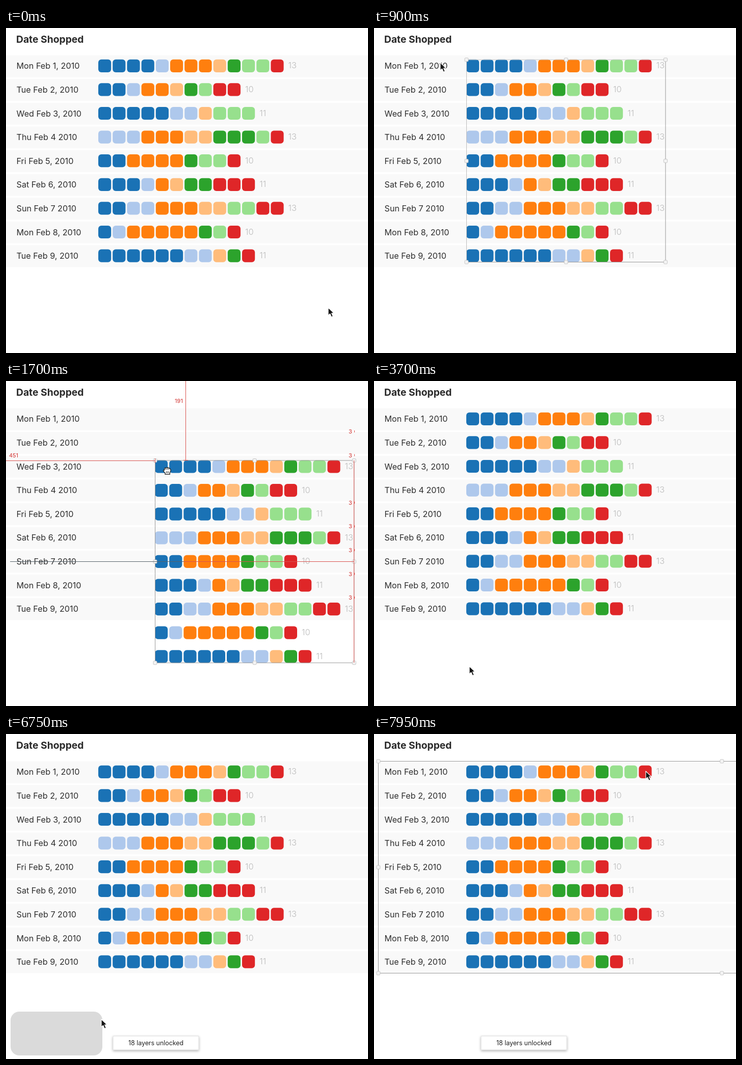
An HTML page that plays this animation: 710x638 px, repeating every 8000 ms.

```html
<!DOCTYPE html>
<html lang="en">
<head>
<meta charset="utf-8">
<title>Date Shopped</title>
<style>
  html, body { margin: 0; width: 100%; height: 100%; overflow: hidden; background: #fff; }
  svg { display: block; width: 710px; height: 638px; font-family: Inter, sans-serif; }
  .title { font-size: 19.3px; font-weight: 700; fill: #2a2a2a; }
  .date { font-size: 16.2px; fill: #2e2e2e; }
  .count { font-size: 16.5px; font-weight: 300; fill: #bcbcbc; }
  .note { font-size: 12.4px; fill: #222; text-anchor: middle; }
  .guide text { font-size: 11px; fill: #d0312f; text-anchor: middle; }
  .red { stroke: #d9534f; }
  .dark { stroke: #56626a; }
  .navy { stroke: #4c5878; }
</style>
</head>
<body>
<svg id="stage" viewBox="0 0 710 638">
  <defs>
    <filter id="shadow" x="-10%" y="-30%" width="120%" height="190%">
      <feDropShadow dx="0" dy="2" stdDeviation="2.5" flood-color="#000" flood-opacity=".32"/>
    </filter>
  </defs>
  <g id="bands" fill="#f9f9f9"></g>
  <text class="title" x="20" y="29">Date Shopped</text>
  <g id="dates"></g>
  <g id="dots"></g>
  <rect id="marquee" fill="#000" fill-opacity=".04" stroke="#000" stroke-opacity=".22"/>
  <g id="box"></g>
  <g id="gaps" class="guide"></g>
  <g id="snapTop" class="guide"></g>
  <g id="snapMid" class="guide"></g>
  <rect id="hud" x="9" y="545" width="180" height="86" rx="17" fill="#dadada"/>
  <g id="note">
    <rect x="210" y="593" width="168" height="27" fill="#fff" stroke="#d2d2d2" stroke-width=".7" filter="url(#shadow)"/>
    <text class="note" x="294" y="611">18 layers unlocked</text>
  </g>
  <g id="arrow">
    <path d="M0 0V15.2L3.6 12L6.3 18.2L9.2 17L6.5 10.9H11.2Z" fill="#151515" stroke="#fff" stroke-width="1.1" stroke-linejoin="round"/>
  </g>
  <g id="hand">
    <path d="M-4 7.2V4.6L-7 1.2Q-8-.8-6.2-1.2L-5.2-.8V-4Q-4.6-6-2.8-5Q-1.6-7.2 0-5.6Q2-7 3-4.9Q5.4-5.6 5.9-3.2Q7.6-2.6 6.8 1.2L5.3 4.4V7.2Z"
      fill="#fff" stroke="#111" stroke-width="1.2" stroke-linejoin="round"/>
    <path d="M-2.6-4.6V-2M.2-5V-2M3-4.5V-2M-1.6 1.5V4.5M.7 1.5V4.5M3 1.5V4.5" fill="none" stroke="#111"/>
  </g>
</svg>
<script>
const LOOP = 8000, STEP = 50, PITCH = 46.6;
const COLORS = {
  b: '#1a72b5', l: '#aec8ec', o: '#ff7f0e', p: '#ffbc7b',
  g: '#2ca32c', n: '#97e08d', r: '#df2628'
};
const ROWS = [
  ['Mon Feb 1, 2010', 'bbbblooopgnnr'],
  ['Tue Feb 2, 2010', 'bbloopgnrr'],
  ['Wed Feb 3, 2010', 'bbbbbllpnnn'],
  ['Thu Feb 4 2010', 'llloooppgggnr'],
  ['Fri Feb 5, 2010', 'bboooognnr'],
  ['Sat Feb 6, 2010', 'bbblopggrrr'],
  ['Sun Feb 7 2010', 'bblloooppnnrr'],
  ['Mon Feb 8, 2010', 'blooooognr'],
  ['Tue Feb 9, 2010', 'bbbbbbllpgr']
];

// tracks: [time, x, y]
const POINTER = [
  [0, 632, 549], [50, 632, 549], [200, 565, 526], [400, 335, 340], [550, 120, 135],
  [650, 28, 62], [700, 28, 62], [900, 130, 68], [1050, 208, 82]
];
const GRAB = [[1050, 213, 88], [1350, 279, 140], [1700, 316, 176]];
const SHIFT = [[1050, 0, 0], [1350, 53, 38], [1700, 111, 93.7]];
const SWEEP = [
  [6800, 187, 560], [6950, 215, 520], [7200, 340, 340], [7400, 480, 130],
  [7550, 560, 64], [7700, 574, 58], [7850, 552, 66], [7950, 533, 73]
];

const $ = id => document.getElementById(id);

function add(parent, tag, attrs, text) {
  const el = document.createElementNS('http://www.w3.org/2000/svg', tag);
  set(el, attrs);
  if (text) el.textContent = text;
  parent.appendChild(el);
  return el;
}

function set(el, attrs) {
  for (const k in attrs) el.setAttribute(k, attrs[k]);
}

function show(id, on) {
  $(id).style.display = on ? '' : 'none';
}

function at(track, t) {
  if (t <= track[0][0]) return track[0].slice(1);
  for (let i = 1; i < track.length; i++) {
    const a = track[i - 1], b = track[i];
    if (t <= b[0]) {
      const k = (t - a[0]) / (b[0] - a[0]);
      return [a[1] + (b[1] - a[1]) * k, a[2] + (b[2] - a[2]) * k];
    }
  }
  return track[track.length - 1].slice(1);
}

function line(parent, cls, x1, y1, x2, y2) {
  add(parent, 'line', { class: cls, x1, y1, x2, y2 });
}

ROWS.forEach(([date, cells], i) => {
  const cy = 74.3 + PITCH * i;
  add($('bands'), 'rect', { x: 0, y: 53.6 + PITCH * i, width: 710, height: 43 });
  add($('dates'), 'text', { class: 'date', x: 20.5, y: cy + 6 }, date);
  [...cells].forEach((c, j) => add($('dots'), 'rect', {
    x: 181 + 28.2 * j, y: cy - 12.6, width: 25.2, height: 25.2, rx: 6, fill: COLORS[c]
  }));
  const end = 181 + 28.2 * cells.length;
  add($('dots'), 'text', { class: 'count', x: end + 6, y: cy + 5 }, String(cells.length));
});

const gapLabels = [];
for (let i = 0; i < 8; i++) {
  const g = add($('gaps'), 'g', {}), y = 99 + PITCH * i;
  add(g, 'text', { x: 675.5, y: y + 4 }, '3');
  line(g, 'red', 683.5, y - 2, 683.5, y + 2);
  gapLabels.push(g);
}

const top1 = $('snapTop');
line(top1, 'navy', 0, 100.5, 234, 100.5);
line(top1, 'red', 0, 110.5, 234, 110.5);
line(top1, 'red', 234.5, 106, 234.5, 115);
add(top1, 'text', { x: 84, y: 103 }, '244');

const mid = $('snapMid');
line(mid, 'red', 352.5, 0, 352.5, 155);
line(mid, 'red', 348, 155.5, 357, 155.5);
line(mid, 'red', 0, 156.5, 292, 156.5);
line(mid, 'red', 292.5, 152, 292.5, 161);
line(mid, 'red', 682.5, 156, 682.5, 553);
line(mid, 'dark', 8, 354.5, 682, 354.5);
line(mid, 'red', 349, 354.5, 682, 354.5);
add(mid, 'text', { x: 339, y: 43 }, '191');
add(mid, 'text', { x: 15, y: 150 }, '451');

// selection frame: four edges and eight handles
const edges = ['#cfcfcf', '#b5b5b5', '#999', '#999'].map(stroke => add($('box'), 'line', { stroke }));
const handles = Array.from({ length: 8 }, () => add($('box'), 'rect', {
  width: 7, height: 7, rx: 1.5, fill: '#f4f4f4', stroke: '#b9b9b9', 'stroke-width': .8
}));

function drawBox(x1, y1, x2, y2, dark) {
  const xm = (x1 + x2) / 2, ym = (y1 + y2) / 2;
  const ends = [[x1, y1, x2, y1], [x1, y1, x1, y2], [x2, y1, x2, y2], [x1, y2, x2, y2]];
  edges.forEach((e, i) => {
    const [a, b, c, d] = ends[i];
    set(e, { x1: a, y1: b, x2: c, y2: d });
    if (i < 2) e.setAttribute('stroke', dark ? '#999' : i ? '#bdbdbd' : '#c8c8c8');
  });
  const spots = [[x1, y1], [xm, y1], [x2, y1], [x1, ym], [x2, ym], [x1, y2], [xm, y2], [x2, y2]];
  handles.forEach((h, i) => set(h, { x: spots[i][0] - 3.5, y: spots[i][1] - 3.5 }));
}

// top of the highest row whose bottom edge lies below y
function touchedTop(first, height, y) {
  const row = Math.max(0, Math.ceil((y - first - height) / PITCH));
  return row > 8 ? null : first + PITCH * row;
}

function drawMarquee(from, to) {
  set($('marquee'), {
    x: Math.min(from[0], to[0]) + .5, y: Math.min(from[1], to[1]) + .5,
    width: Math.abs(from[0] - to[0]), height: Math.abs(from[1] - to[1])
  });
}

function draw(t) {
  const grabbing = t >= 1100 && t < 3700;
  const shift = t < 3700 ? at(SHIFT, t) : [0, 0];
  const tip = at(t < 3700 ? POINTER : SWEEP, t);
  const hand = at(GRAB, t);

  show('arrow', !grabbing);
  show('hand', grabbing);
  $('arrow').setAttribute('transform', `translate(${tip})`);
  $('hand').setAttribute('transform', `translate(${hand})`);
  $('dots').setAttribute('transform', `translate(${shift})`);

  const first = t >= 100 && t < 700, second = t >= 6850 && t < 7600;
  show('marquee', first || second);
  if (first) drawMarquee([632, 549], tip);
  if (second) drawMarquee([187, 560], tip);

  let top = null;
  if (t >= 100 && t < 3700) {
    top = touchedTop(62, 25, first ? tip[1] : 0);
    if (top !== null && tip[0] < 571) {
      const [dx, dy] = shift;
      drawBox(181.5 + dx, top + .3 + dy, 571.8 + dx, 459.5 + dy, t >= 1600);
    } else top = null;
  } else if (t >= 6850) {
    top = touchedTop(53.5, 43, second ? tip[1] : 0);
    if (top !== null) drawBox(8.5, top, 1356, 469.5, true);
  }
  show('box', top !== null);

  show('gaps', t >= 1200 && t < 3700);
  const hidden = t < 1600 ? 1 : 2;
  gapLabels.forEach((g, i) => g.style.display = i === hidden ? 'none' : '');
  show('snapTop', t >= 1300 && t < 1450);
  show('snapMid', t >= 1700 && t < 3700);

  const hud = t < 4700 ? 0 : t < 4750 ? .5 : Math.min(1, Math.max(0, 1 - (t - 6750) / 950));
  $('hud').setAttribute('opacity', hud);
  show('note', t >= 4700);
}

const start = performance.now();
function tick() {
  const t = (performance.now() - start) % LOOP;
  draw(Math.floor(t / STEP) * STEP);
  requestAnimationFrame(tick);
}
tick();
</script>
</body>
</html>
```
